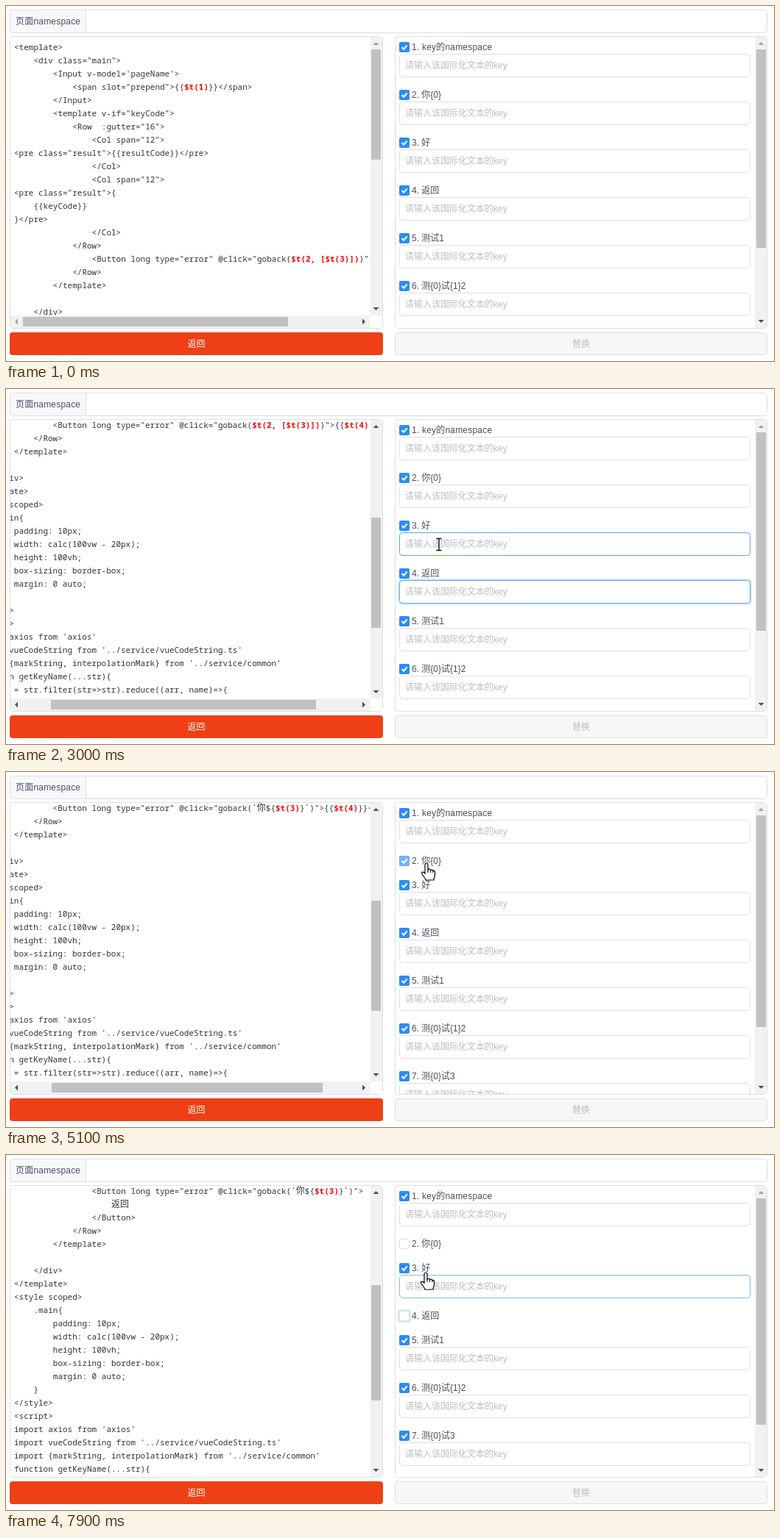
Animation, 1043 px wide and 483 px high, one loop 8000 ms. Source, as an HTML page:

```html
<!DOCTYPE html>
<html lang="zh">
<head>
<meta charset="utf-8">
<style>
html, body { margin: 0; width: 100%; height: 100%; overflow: hidden; background: #fff; }
svg { display: block; width: 100%; height: 100%; }
text { font: 12px "Liberation Sans", "Noto Sans CJK SC", sans-serif; fill: #495060; white-space: pre; }
.code { font: 11px "Noto Sans Mono", "Noto Sans CJK SC", monospace; fill: #30343a; }
.mark { font-weight: bold; }
.cjk { font: 12px "Noto Sans CJK SC", sans-serif; }
.wide { letter-spacing: .2px; }
.hint { fill: #bbbec4; }
</style>
</head>
<body>
<svg id="stage" viewBox="0 0 1043 483"></svg>
<script>
const stage = document.getElementById('stage');
const LOOP = 8000, STEP = 100;
const GREY = [221, 222, 225], BLUE = [87, 163, 243];
const SCROLL_AT = 1700, DROP2 = 5100, DROP4 = 6300;

// «n ... » wraps the text marked with key n
const HEAD = `<template>
    <div class="main">
        <Input v-model='pageName'>
            <span slot="prepend">{{«1$t(1)»}}</span>
        </Input>
        <template v-if="keyCode">
            <Row  :gutter="16">
                <Col span="12">
<pre class="result">{{resultCode}}</pre>
                </Col>
                <Col span="12">
<pre class="result">{
    {{keyCode}}
}</pre>
                </Col>
            </Row>
`;
const TAIL = `
            </Row>
        </template>

    </div>
</template>
<style scoped>
    .main{
        padding: 10px;
        width: calc(100vw - 20px);
        height: 100vh;
        box-sizing: border-box;
        margin: 0 auto;
    }
</style>
<script>
import axios from 'axios'
import vueCodeString from '../service/vueCodeString.ts'
import {markString, interpolationMark} from '../service/common'
function getKeyName(...str){
    str = str.filter(str=>str).reduce((arr, name)=>{`;
const OPEN = '                <Button long type="error" @click="goback(';
const BOTH = '«2$t(2, [«3$t(3)»])»', ONE = '`你${«3$t(3)»}`';
const LABELS = ['key的namespace', '你{0}', '好', '返回', '测试1', '测{0}试{1}2', '测{0}试3'];
const LABEL_END = [659, 592, 576, 588, 595, 625, 610];

// pointer path: time, x, y
const PATH = [
  [300, 1019, 110], [500, 830, 127], [600, 720, 150], [700, 624, 188], [800, 572, 235],
  [1000, 569, 259], [1100, 569, 259], [1300, 574, 271], [2000, 574, 271], [2600, 588, 211],
  [3400, 588, 211], [3800, 577, 146], [4700, 577, 146], [5000, 571, 124], [5300, 571, 124],
  [5800, 563, 214], [7300, 563, 214], [7900, 570, 160], [8000, 570, 160]
];
// focused field: from, to, key
const FOCUS = [[1200, 3100, 4], [3100, 3900, 3], [3900, DROP2, 2]];

const mix = (a, b, k) => `rgb(${a.map((v, i) => Math.round(v + (b[i] - v) * k))})`;
const esc = s => s.replace(/&/g, '&amp;').replace(/</g, '&lt;').replace(/>/g, '&gt;');
const text = (x, y, s, cls = '', extra = '') => `<text x="${x}" y="${y}" class="${cls}" ${extra}>${s}</text>`;
const fill = (x, y, w, h, color, extra = '') =>
  `<rect x="${x}" y="${y}" width="${w}" height="${h}" fill="${color}" ${extra}/>`;
const frame = (x, y, w, h, stroke = '#dddee1', bg = '#fff', r = 4) =>
  fill(x + .5, y + .5, w - 1, h - 1, bg, `rx="${r}" stroke="${stroke}"`);
const arrow = (x, y, turn, live) =>
  `<path d="M-4 2L0-2L4 2z" transform="translate(${x} ${y}) rotate(${turn})" fill="${live ? '#505050' : '#a3a3a3'}"/>`;

function pointer(t) {
  const i = PATH.findIndex(p => p[0] > t);
  if (i < 1) return null;
  const [t0, x0, y0] = PATH[i - 1], [t1, x1, y1] = PATH[i], k = (t - t0) / (t1 - t0);
  return [x0 + (x1 - x0) * k, y0 + (y1 - y0) * k];
}

function layout(t) {
  let y = 56;
  return LABELS.map((label, i) => {
    const on = !(i === 1 && t >= DROP2 || i === 3 && t >= DROP4);
    const row = { key: i + 1, label, y, on };
    y += on ? 65 : 33;
    return row;
  });
}

const focusAt = t => FOCUS.find(f => t >= f[0] && t < f[1]);

function hoverAt(t) {
  const p = pointer(t);
  if (!p) return {};
  const [x, y] = p, rows = layout(t);
  if (x > 534 && x < 1011) {
    const field = rows.find(r => r.on && y >= r.y + 9 && y < r.y + 41);
    if (field) return { kind: 'beam', key: field.key };
    if (rows.some(r => Math.abs(y - r.y) < 9 && x < LABEL_END[r.key - 1])) return { kind: 'hand' };
  }
  return { kind: 'arrow' };
}

// border strength: 200 ms transition
function lit(key, t) {
  let n = 0;
  for (let s = 0; s < 3; s++) {
    const u = t - s * STEP, f = focusAt(u);
    if (f && f[2] === key || hoverAt(u).key === key) n++;
  }
  return n / 3;
}

function codeLines(t) {
  const button = t < DROP2 ? OPEN + BOTH + ')">{{«4$t(4)»}}</Button>'
    : t < DROP4 ? OPEN + ONE + ')">{{«4$t(4)»}}</Button>'
    : OPEN + ONE + ')">\n                    返回\n                </Button>';
  return (HEAD + button + TAIL).split('\n');
}

function codePanel(t) {
  const moved = t >= SCROLL_AT, full = t >= DROP4;
  const sx = moved && !full ? 53 : 0, sy = moved ? 295 : 0;
  const bottom = full ? 438 : 421;
  const focus = focusAt(t);
  const glow = focus ? .5 - .5 * Math.cos((t - focus[0]) / 900 * 2 * Math.PI) : 0;
  const color = n => focus && (n === focus[2] || focus[2] === 2 && n === 3) ? mix([255, 0, 0], [255, 110, 0], glow) : '#f00';
  const style = s => esc(s)
    .replace(/[\u4e00-\u9fff]+/g, '<tspan class="cjk">$&</tspan>')
    .replace(/«(\d)/g, (_, n) => `<tspan class="mark" fill="${color(+n)}" style="fill:${color(+n)}">`)
    .replace(/»/g, '</tspan>');
  let out = frame(5, 41, 507, 398) + '<g clip-path="url(#code)">';
  codeLines(t).forEach((s, i) => {
    const y = 60 + i * 18 - sy;
    if (y > 35 && y < bottom + 12) out += text(11 - sx, y, style(s), 'code');
  });
  out += '</g>' + fill(495, 42, 16, bottom - 42, '#f1f1f1');
  const [top, size] = full ? [177, 157] : [moved ? 175 : 59, 150];
  out += fill(496, top, 13, size, '#c1c1c1') + arrow(502.5, 51, 0, moved) + arrow(502.5, bottom - 9, 180, true);
  if (!full) {
    const [left, width] = t >= DROP2 ? [62, 368] : [moved ? 61 : 23, 360];
    out += fill(6, 421, 505, 17, '#fff') + fill(6, 421, 488, 17, '#f1f1f1') +
      fill(left, 423, width, 13, '#c1c1c1') + arrow(14, 429.5, -90, moved) + arrow(486, 429.5, 90, true);
  }
  return out;
}

function checkbox(row, t) {
  const y = row.y - 7;
  const fade = row.on ? 1 : row.key === 2 && t < DROP2 + STEP ? .65 : row.key === 4 && t < DROP4 + STEP ? .3 : 0;
  const ring = row.key === 2 && t >= DROP2 + STEP && t < 6100 || row.key === 4 && t >= DROP4;
  return (ring ? fill(532, y - 2, 18, 18, '#2d8cf0', 'rx="4" opacity=".2"') : '') +
    frame(534, y, 14, 14, '#dddee1', '#fff', 2) +
    (fade ? `<g opacity="${fade}">${fill(534, y, 14, 14, '#2d8cf0', 'rx="2"')}
      <path d="M537.5 ${row.y}l2.6 2.7 4.6-5.2" fill="none" stroke="#fff" stroke-width="2"/></g>` : '');
}

function field(row, t) {
  const y = row.y + 9, focus = focusAt(t), active = focus && focus[2] === row.key;
  const caret = active && (t - focus[0]) % 1000 < 500;
  return (active ? fill(532, y - 2, 481, 36, '#2d8cf0', 'rx="6" opacity=".2"') : '') +
    frame(534, y, 477, 32, mix(GREY, BLUE, lit(row.key, t))) +
    text(542, y + 20, '请输入该国际化文本的key', 'hint') +
    (caret ? fill(542, y + 9, 1, 14, '#495060') : '');
}

function keyPanel(t) {
  let out = frame(528, 41, 506, 398) + '<g clip-path="url(#keys)">';
  for (const row of layout(t)) {
    out += checkbox(row, t) + text(551, row.y + 4, `${row.key}. ${row.label}`, row.key === 1 ? 'wide' : '');
    if (row.on) out += field(row, t);
  }
  const p = pointer(t), size = t < DROP2 ? 270 : t < DROP4 ? 288 : 308;
  return out + '</g>' + fill(1017, 42, 16, 396, '#f1f1f1') +
    fill(1019, 59, 13, size, p && p[0] > 1017 ? '#a8a8a8' : '#c1c1c1') +
    arrow(1025.5, 51, 0, false) + arrow(1025.5, 429, 180, true);
}

const CURSORS = {
  arrow: '<path d="M0 0v16l3.7-3.6 2.4 5.6 2.2-1-2.4-5.2h5z" fill="#fff" stroke="#000"/>',
  beam: '<path d="M-3.5-7.5h3l.5.5.5-.5h3M0-7V8M-3.5 8.5h3l.5-.5.5.5h3" fill="none" stroke="#000" stroke-width="1.3"/>',
  hand: '<path d="M-2 14V2a2 2 0 0 1 4 0V9c1-1.5 3.4-1 3.6.7c1-1.2 3.2-.8 3.4 1c1-.9 2.5-.3 2.5 1.3V16c0 3-1.5 4-1.5 7H-1c-.5-3-5-7-5.5-9.5c0-1.8 2.5-1.8 4.5.5z" fill="#fff" stroke="#000" stroke-width="1.2"/>' +
    '<path d="M2 9v4M5.6 10v3M9 11v2" stroke="#000"/>'
};

function cursor(t) {
  const p = pointer(t);
  return p ? `<g transform="translate(${p.map(Math.round)})">${CURSORS[hoverAt(t).kind]}</g>` : '';
}

const CHROME = `<defs>
  <clipPath id="code"><rect x="6" y="42" width="488" height="396"/></clipPath>
  <clipPath id="keys"><rect x="529" y="42" width="488" height="396"/></clipPath></defs>` +
  fill(0, 0, 1043, 483, '#fff') + frame(5, 5, 1029, 32) +
  '<path d="M108.5 5.5H9.5a4 4 0 0 0-4 4v23a4 4 0 0 0 4 4h99z" fill="#f8f8f9" stroke="#dddee1"/>' +
  text(13, 25, '页面namespace', 'wide') +
  fill(5, 444, 507, 31, '#ee4014', 'rx="4"') +
  text(258.5, 464, '返回', '', 'text-anchor="middle" style="fill:#fff"') +
  frame(528, 444, 506, 31, '#dddee1', '#f7f7f7') +
  text(781, 464, '替换', 'hint', 'text-anchor="middle"');

let last = -1;
function tick(now) {
  const t = Math.floor(now % LOOP / STEP) * STEP;
  if (t !== last) {
    last = t;
    stage.innerHTML = CHROME + codePanel(t) + keyPanel(t) + cursor(t);
  }
  requestAnimationFrame(tick);
}
tick(performance.now());
</script>
</body>
</html>
```
